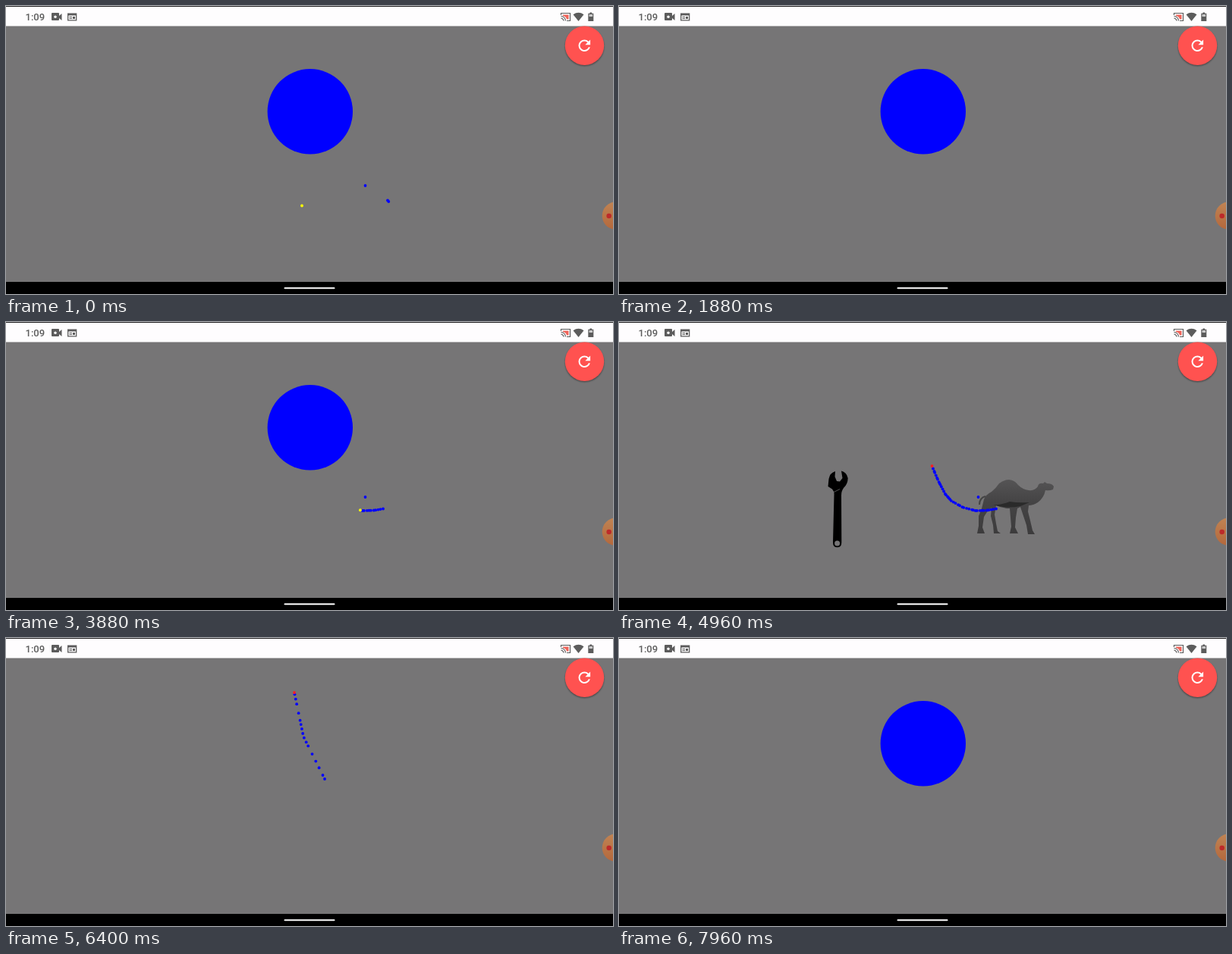
An HTML page with a canvas that plays this animation: 800 px wide and 380 px high, repeating every 8000 ms.

```html
<!DOCTYPE html>
<html lang="en">
<head>
<meta charset="utf-8">
<title>Touch trial</title>
<style>
html, body { margin: 0; width: 100%; height: 100%; overflow: hidden; background: #767576; }
svg, canvas { position: absolute; left: 0; top: 0; width: 800px; height: 380px; }
text { font: 500 13px Roboto, sans-serif; fill: #5c5c5c; }
</style>
</head>
<body>
<svg viewBox="0 0 800 380">
  <defs>
    <linearGradient id="hide" x2="0" y2="1">
      <stop stop-color="#555455"/><stop offset=".4" stop-color="#454445"/><stop offset="1" stop-color="#3c3b3c"/>
    </linearGradient>
    <linearGradient id="amber" x2="0" y2="1">
      <stop stop-color="#c08353"/><stop offset="1" stop-color="#b4683c"/>
    </linearGradient>
    <filter id="soft" x="-20%" y="-20%" width="140%" height="140%"><feGaussianBlur stdDeviation="1.2"/></filter>
  </defs>
  <rect width="800" height="380" fill="#767576"/>

  <circle id="target" cx="400.8" cy="139.3" r="56.2" fill="#00f"/>

  <g id="choices">
    <!-- wrench -->
    <path d="M283.5 228Q284 224 281 220.5L275.5 217 276.5 207Q278 199 285 197L284.500 204 287 210 291 210.500 294.500 206 293 196.500Q300 198 301.700 206 301.500 214 296 219 293 223 293 229L293.300 291Q293.300 297.300 287.600 297.300 282 297.300 282 291Z"/>
    <path d="M283 224.500l8-4" stroke="#555" fill="none"/>
    <circle cx="287.600" cy="292" r="3.500" fill="#767576"/>
    <!-- camel -->
    <path d="M483 230Q475 232 475 241" fill="none" stroke="#444" stroke-width="2"/>
    <path fill="url(#hide)" d="M481 234Q483 228 491 224 497 219 501 213 507 208 514 208 522 209 526 215 532 221 540 222 548 223 552 217 553 212 559 213L561 211 564 213Q571 213 573 217L572 221Q567 223 562 222 560 232 552 238 546 242 540 242L539 250 542 262 545 275 548 280 539 280 537 268 533 256 529 244 525 246 523 258 522 271 526 279 515 279 517 270 516 258 515 246Q505 246 497 242L495 254 497 266 499 276 503 279 494 279 493 268 490 256 491 245 486 249 481 257 479 271 482 279 472 279 474 269 474 256 478 246Z"/>
    <path d="M493 241Q510 247 529 243L541 238Q526 239 515 237 503 242 493 241Z" fill="#2a2a2a"/>
  </g>

  <rect id="reward" x="216" y="26" width="369" height="339" fill="#008000"/>

  <!-- system bars -->
  <rect width="800" height="26.500" fill="#fefdfe"/>
  <rect width="800" height="1" fill="#222"/>
  <rect y="364" width="800" height="16"/>
  <path d="M367.500 372.300H432.500" stroke="#fff" stroke-width="2" stroke-linecap="round"/>
  <text x="25.500" y="19">1:09</text>
  <g fill="#5c5c5c">
    <path d="M61 9h8q1 0 1 1v3l3.500-3v9l-3.500-3v2q0 1-1 1h-8q-1 0-1-1v-8q0-1 1-1z"/>
    <circle cx="65" cy="14.300" r="1.700" fill="#fff"/>
    <path fill-rule="evenodd" d="M81 9.500h12.300v10H81zM82.300 12.500v5.700H92v-5.700z"/>
    <path d="M83.500 14h3.500v1h-3.500zM83.500 16h3.500v1h-3.500zM88 14h3v3h-3z"/>
    <path d="M747.500 11.200Q754.500 6.300 761.500 11.200L754.500 20Z"/>
    <path d="M769.500 8.500h2.500v1.200h2.300V20h-7V9.700h2.200z"/>
    <path d="M768.500 11h4.600v3h-4.600z" fill="#c9c9c9"/>
  </g>
  <path d="M734 11.500h7.500v6h-2.500q-1-4-5-4.500z" fill="#f0655a"/>
  <path d="M731.500 12V9.500h12v10H739M731.500 13.500q5.500.500 6 6M731.500 16q3 .5 3.500 3.500" fill="none" stroke="#5c5c5c" stroke-width="1.200"/>

  <!-- reload button -->
  <circle cx="762.500" cy="53.500" r="25.500" opacity=".45" filter="url(#soft)"/>
  <circle cx="762.500" cy="52.200" r="25.700" fill="#ff5250"/>
  <path fill="#fff" transform="translate(750.700 40.600) scale(.97)" d="M17.650 6.350A7.960 7.960 0 0 0 12 4a8 8 0 1 0 7.730 10h-2.080A6 6 0 1 1 12 6c1.660 0 3.140.69 4.220 1.780L13 11h7V4z"/>

  <circle cx="804" cy="276.700" r="18.300" fill="url(#amber)"/>
  <circle cx="794.700" cy="277" r="3.300" fill="#bd2a2a"/>
</svg>
<canvas id="trail" width="800" height="380"></canvas>

<script>
const LOOP = 8000;
const byId = id => document.getElementById(id);
const ctx = byId('trail').getContext('2d');

// on: disc appears, go: finger down, hit: disc reached, rest: finger lifted,
// show: choices, pick..end: second stroke, win: green panel, off: cleared.
// Strokes are lists of flat x,y polylines.
const trials = [
  { on: 0, go: 0, hit: 200, rest: 440, show: 840, pick: 1100, end: 1400, win: 1440, off: 1720,
    old: [[473.5, 237], [503, 256.5], [504.3, 258]], gap: 4.6,
    reach: [[390, 263.5, 391, 245, 394, 217, 395, 204, 398, 194]],
    over: [[399, 184, 403, 115]],
    choose: [[387, 191, 351, 214, 324, 229, 305, 239.5]] },
  { on: 1880, go: 1920, hit: 2200, rest: 2360, show: 2840, pick: 3060, end: 3220, win: 3240, off: 3560,
    old: [[301, 241.5]], gap: 3.6,
    reach: [[305, 248, 318, 239, 330, 228, 345, 216, 356, 204, 369, 193.5]],
    over: [[376, 184, 408, 135, 430, 77]],
    choose: [[412, 193, 434, 210, 473.5, 231]] },
  { on: 3720, go: 3740, hit: 4280, rest: 4400, show: 4960, pick: 5180, end: 5400, win: 5440, off: 5720,
    old: [[473.5, 231]], gap: 3,
    reach: [[497, 246.5, 485, 248.5, 470, 249, 453, 244.5, 438, 236, 430, 227, 421, 210, 412.5, 190]],
    over: [[409, 182, 397, 140, 392, 108]],
    choose: [[394, 214, 402, 219, 426, 226.5, 446, 232.5], [453, 235, 472.5, 240.5]] },
  { on: 5880, go: 5920, hit: 6280, rest: 6400, show: 6960, pick: 7180, end: 7480, win: 7520, off: 7880,
    old: [[472.5, 240.5]], gap: 2.5,
    reach: [[491, 247, 472, 239.5, 458, 227], [450, 221.5, 437, 205.5, 425.5, 194]],
    over: [[420, 186, 392, 130, 380, 72]],
    choose: [[334.5, 218.5, 318, 229, 302.5, 242]] },
  { on: 7960, go: LOOP, hit: LOOP }
];

let seed = 7;
const rand = () => (seed = seed * 16807 % 2147483647) / 2147483647;

// Unevenly spaced dots along a polyline, ending on its last point.
function sample(line, gap) {
  const dots = [];
  let next = 0;
  for (let i = 0; i + 3 < line.length; i += 2) {
    const [x, y, x2, y2] = line.slice(i, i + 4);
    const len = Math.hypot(x2 - x, y2 - y);
    for (; next < len; next += gap * (0.6 + 0.8 * rand())) {
      const k = next / len;
      dots.push([x + (x2 - x) * k, y + (y2 - y) * k]);
    }
    next -= len;
  }
  dots.push(line.slice(-2));
  return dots;
}

for (const s of trials.slice(0, -1)) {
  s.reach = s.reach.flatMap(l => sample(l, s.gap));
  s.over = s.over.flatMap(l => sample(l, 9));
  s.choose = s.choose.flatMap(l => sample(l, 3.6));
}

function drawn(dots, t, from, to) {
  const k = Math.min(1, (t - from) / (to - from));
  return k < 0 ? [] : dots.slice(0, Math.max(1, Math.ceil(dots.length * k)));
}

function paintDots(dots, tip) {
  dots.forEach(([x, y], i) => {
    ctx.fillStyle = i === dots.length - 1 ? tip : '#00f';
    ctx.beginPath();
    ctx.arc(x, y, 1.9, 0, 7);
    ctx.fill();
  });
}

const toggle = (id, on) => byId(id).setAttribute('visibility', on ? 'visible' : 'hidden');

function render(t) {
  const s = trials.findLast(k => t >= k.on);
  const within = (a, b) => t >= a && t < b;
  toggle('target', t < s.hit);
  toggle('choices', within(s.show, s.win));
  toggle('reward', within(s.win, s.off));

  ctx.clearRect(0, 0, 800, 380);
  const yellow = '#ff0', red = '#ff1c24';
  if (within(s.go, s.hit)) {
    paintDots([...s.old, ...drawn(s.reach, t, s.go, s.hit)], yellow);
  } else if (within(s.hit, s.show)) {
    paintDots(drawn(s.over, t, s.hit, s.rest), t < s.rest ? yellow : red);
  } else if (within(s.show, s.off)) {
    const dots = [...s.old, ...s.reach, ...drawn(s.choose, t, s.pick, s.end)];
    paintDots(dots, within(s.pick, s.win) ? yellow : red);
  }
}

const start = performance.now();
function tick() {
  render((performance.now() - start) % LOOP);
  requestAnimationFrame(tick);
}
tick();
</script>
</body>
</html>
```
